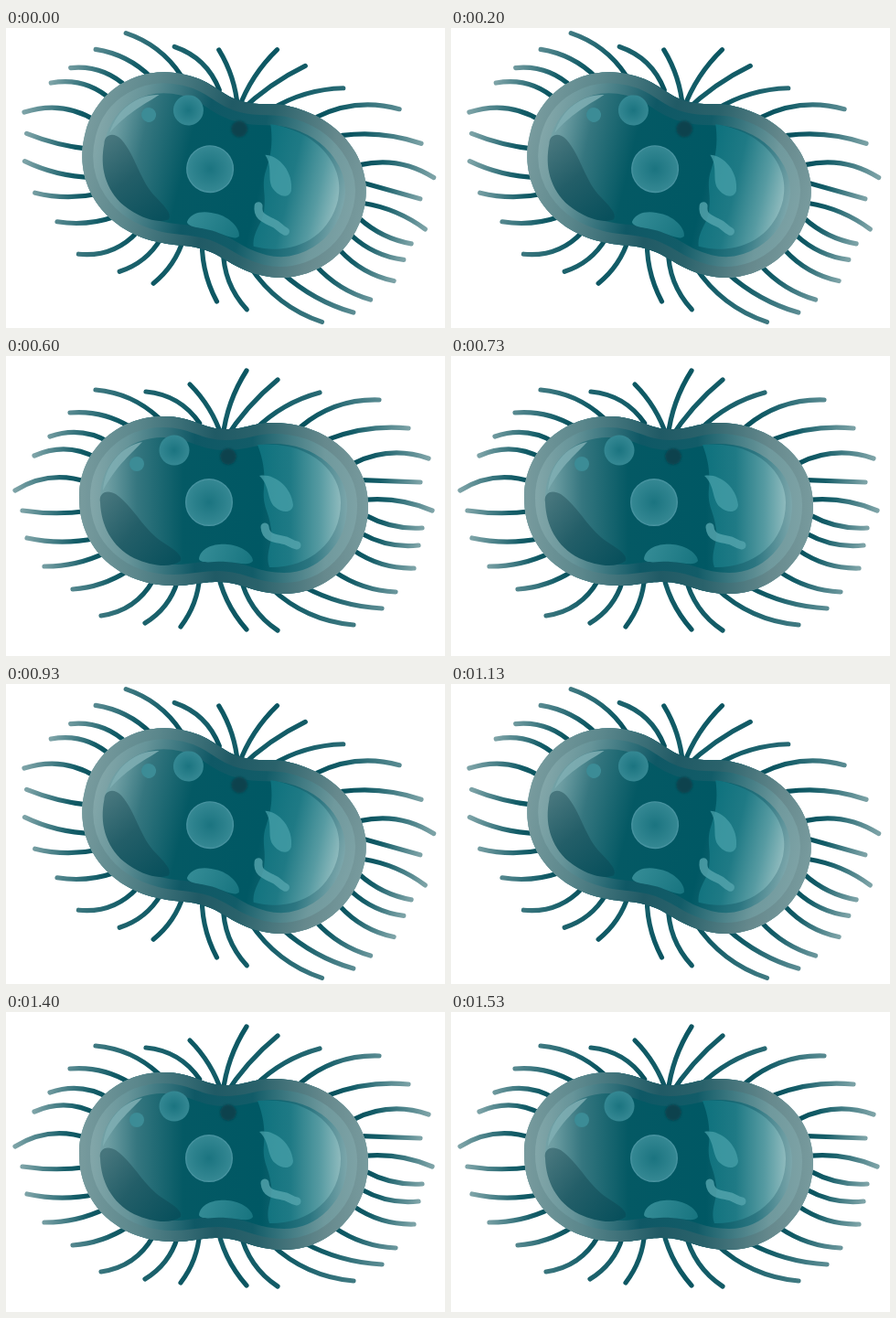
An HTML page for the animation above (1590 ms loop, 480 px wide and 328 px high).

```html
<!DOCTYPE html>
<html lang="en">
<head>
<meta charset="utf-8">
<title>Cell</title>
<style>
html, body { margin: 0; width: 100%; height: 100%; overflow: hidden; background: #fff; }
svg { display: block; width: 480px; height: 328px; }
</style>
</head>
<body>
<svg viewBox="0 0 480 328" xmlns="http://www.w3.org/2000/svg">
  <defs>
    <path id="shape" d="M80 155C80 105 120 66 172 66C205 66 215 80 240 80C262 80 270 73 292 73C350 73 396 112 396 163C396 220 352 260 304 260C270 260 258 247 232 247C212 247 205 251 183 251C125 251 80 212 80 155Z"/>
    <clipPath id="inside"><use href="#shape"/></clipPath>
    <filter id="soft" x="-50%" y="-50%" width="200%" height="200%"><feGaussianBlur stdDeviation="1.2"/></filter>
  </defs>
  <g id="cell">
    <g id="cilia" fill="none" stroke-width="5.2" stroke-linecap="round"></g>
    <use href="#shape" fill="url(#plasma)"/>
    <g clip-path="url(#inside)" fill="none">
      <use href="#shape" stroke="url(#rimIn)" stroke-width="46"/>
      <use href="#shape" stroke="url(#rimOut)" stroke-width="24"/>
    </g>
    <path fill="url(#lobe)" d="M275 97C330 92 366 125 366 160C366 205 330 232 288 231C283 215 292 205 290 190C288 170 280 165 282 145C284 125 280 110 275 97Z"/>
    <path fill="url(#shade)" d="M103 160C101 150 110 145 120 151C140 165 150 190 172 204C185 212 193 218 191 224C180 232 160 230 140 221C115 208 104 185 103 160Z"/>
    <path fill="#80b0b4" fill-opacity=".85" d="M106 147C108 119 126 99 149 94C139 105 121 119 106 147Z"/>
    <circle cx="184" cy="103" r="16.5" fill="url(#bubble)"/>
    <circle cx="143" cy="118" r="8" fill="#3c8c96"/>
    <circle cx="243" cy="110" r="9" fill="#09424e" filter="url(#soft)"/>
    <circle cx="222" cy="160" r="25.3" fill="url(#bubble)" stroke="#4793a0" stroke-width="1.4"/>
    <path fill="url(#dome)" d="M211 222C213 209 228 205 242 206C258 207 270 217 270 224C266 230 255 226 240 225C228 224 214 228 211 222Z"/>
    <path fill="#47a0aa" fill-opacity=".75" d="M277 131C292 128 312 142 314 163C313 172 302 172 294 165C285 157 289 142 277 131Z"/>
    <path fill="none" stroke="#56a5ae" stroke-opacity=".8" stroke-width="9" stroke-linecap="round" d="M283 187C284 198 292 199 302 201C310 202 311 206 318 207"/>
  </g>
</svg>
<script>
const NS = 'http://www.w3.org/2000/svg';
const defs = document.querySelector('defs');
const cell = document.getElementById('cell');
const cilia = document.getElementById('cilia');

function add(parent, tag, attrs) {
  const el = document.createElementNS(NS, tag);
  for (const k in attrs) el.setAttribute(k, attrs[k]);
  return parent.appendChild(el);
}

function gradient(id, [x1, y1, x2, y2], stops) {
  const g = add(defs, 'linearGradient', { id, x1, y1, x2, y2, gradientUnits: 'userSpaceOnUse' });
  for (const [offset, color] of stops) add(g, 'stop', { offset, 'stop-color': color });
}

const across = [80, 160, 396, 160];
gradient('rimOut', across, [[0, '#789b9e'], [.2, '#5b878c'], [.47, '#205a65'], [.62, '#2a626b'], [.85, '#66898d'], [1, '#789b9e']]);
gradient('rimIn', across, [[0, '#8bacae'], [.17, '#669499'], [.4, '#0f5865'], [.6, '#125c68'], [.85, '#6f999d'], [1, '#82a5a8']]);
gradient('plasma', across, [[0, '#86afb2'], [.1, '#6d9da2'], [.2, '#35767f'], [.36, '#045964'], [.63, '#005864'], [.8, '#2c7681'], [.94, '#84abaf']]);
gradient('lobe', [275, 160, 366, 160], [[0, '#0d717d'], [.4, '#1f7a85'], [.75, '#579ba2'], [1, '#8ebabd']]);
gradient('shade', [103, 160, 185, 225], [[0, '#47767d'], [.45, '#235e68'], [1, '#08505c']]);
gradient('dome', [211, 206, 270, 228], [[0, '#368d97'], [1, '#17747f']]);
const bubble = add(defs, 'radialGradient', { id: 'bubble' });
add(bubble, 'stop', { offset: 0, 'stop-color': '#1b7480' });
add(bubble, 'stop', { offset: 1, 'stop-color': '#358893' });

const mix = (a, b, k) => Math.round(a + (b - a) * k);

// A hair grows from the lobe at the given angle to its tip, bowed sideways
function hair(cx, cy, [x, y, angle, bow]) {
  const a = angle * Math.PI / 180;
  const rx = cx + 90 * Math.cos(a), ry = cy + 90 * Math.sin(a);
  const dx = x - rx, dy = y - ry, len = Math.hypot(dx, dy);
  const bx = (x + rx) / 2 - bow * dy / len;
  const by = (y + ry) / 2 + bow * dx / len;
  const k = Math.min(1, Math.abs(x - 238) / 205) ** 2;
  const tip = `rgb(${mix(8, 125, k)},${mix(84, 163, k)},${mix(96, 167, k)})`;
  const id = 'hair' + cilia.childElementCount;
  gradient(id, [rx, ry, x, y], [[0, '#08505c'], [.3, '#145d68'], [1, tip]]);
  add(cilia, 'path', { d: `M${rx} ${ry}Q${bx} ${by} ${x} ${y}`, stroke: `url(#${id})` });
}

// Tip x, tip y, root angle, bow
const left = [
  [297, 26, 313, -7], [263, 16, 311, -9], [201, 31, 310, 8], [153, 39, 292, 16],
  [98, 37, 263, 13], [70, 62, 242, 11], [48, 88, 224, 15], [31, 109, 210, 17],
  [10, 147, 192, 19], [18, 169, 172, -5], [23, 199, 152, -8], [42, 230, 140, -8],
  [73, 255, 120, -8], [104, 284, 101, -17], [152, 292, 84, -11], [191, 296, 68, -9],
  [263, 299, 54.5, 11]
];
const right = [
  [343, 40, 249, -11], [408, 48, 282, -17], [440, 79, 304, -10], [462, 112, 328, -17],
  [453, 138, 341, 0], [466, 169, 355, -9], [455, 188, 6, 9], [451, 207, 19, 10],
  [446, 232, 32, 11], [426, 258, 52, 10], [411, 276, 76, 10], [380, 294, 99, 17],
  [297, 300, 122, 14]
];
left.forEach(h => hair(178, 157, h));
right.forEach(h => hair(304, 165, h));

const LOOP = 1590, HOLD = 400;
const TILT = 'translate(238.7 159.8) rotate(13.5) translate(-238.5 -161.8)';

// The cell snaps between a tilted and a level pose
function draw(ms) {
  const level = Math.floor((ms % LOOP) / HOLD) % 2;
  cell.setAttribute('transform', level ? '' : TILT);
}

const start = performance.now();
function tick() {
  draw(performance.now() - start);
  requestAnimationFrame(tick);
}
draw(0);
requestAnimationFrame(tick);
</script>
</body>
</html>
```
